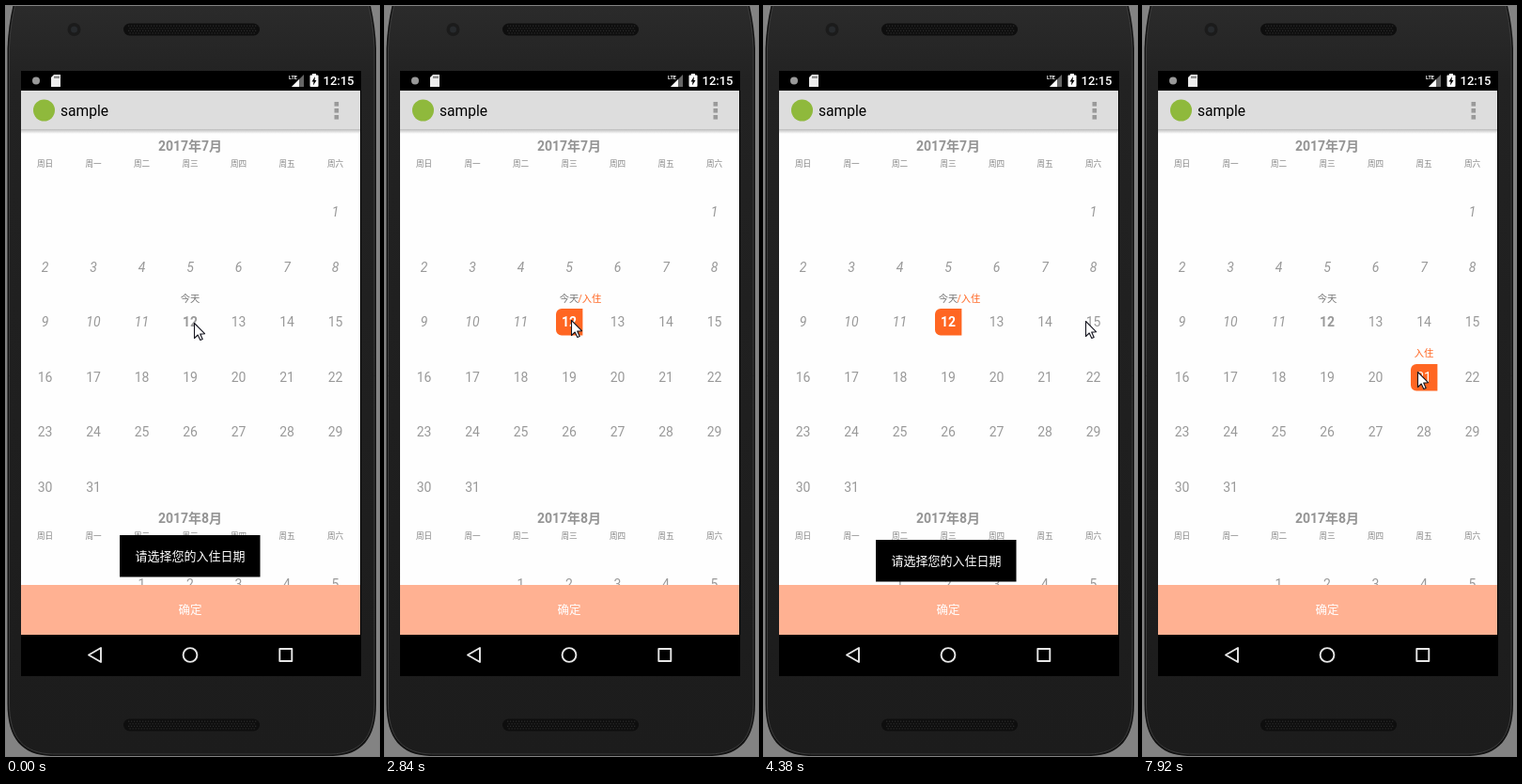
An HTML page with a canvas that plays this animation: 397 by 798 pixels, repeating every 8000 ms.

```html
<!DOCTYPE html>
<html lang="zh-CN">
<head>
<meta charset="utf-8">
<title>Calendar picker</title>
<style>
html, body { margin: 0; width: 100%; height: 100%; overflow: hidden; background: #838383; }
canvas { display: block; width: 397px; height: 798px; }
</style>
</head>
<body>
<canvas id="stage"></canvas>
<script>
const W = 397, H = 798, LOOP = 8000, BEAT = 130;
const FONT = 'Roboto, "Noto Sans CJK SC", "Noto Sans CJK", sans-serif';
const GREY = '#999', ORANGE = '#ff6622';
const CHECK_IN = 2840, CHECK_OUT = 5370, RESTART = 7640;
const canvas = document.getElementById('stage');
const dpr = window.devicePixelRatio || 1;
canvas.width = W * dpr;
canvas.height = H * dpr;
const ctx = canvas.getContext('2d');

// Pointer strokes: start time, beats, end point
const STROKES = [
  [530, 2, 195, 334], [1600, 3, 240, 333], [2150, 3, 198, 334],
  [3350, 2, 283, 346], [3650, 4, 342, 335], [6650, 2, 343, 336],
  [6920, 2, 322, 382], [7190, 2, 304, 395], [7920, 1, 292, 389]
];

const clamp = v => Math.max(0, Math.min(1, v));
const smooth = v => v * v * (3 - 2 * v);
const beats = (t, start) => Math.floor((t - start + 20) / BEAT);

function pointerAt(t) {
  let x = 200, y = 337;
  for (const [start, count, endX, endY] of STROKES) {
    if (t < start) break;
    const p = smooth(clamp((beats(t, start) + 1) / count));
    x += (endX - x) * p;
    y += (endY - y) * p;
  }
  return [Math.round(x), Math.round(y)];
}

function toastAt(t) {
  const leaving = t >= 4380;
  const alpha = t < 920 ? 1 : t < 4530 ? clamp(beats(t, CHECK_IN) / 3.2) : 0;
  return leaving ? [alpha, 119, 568] : [alpha, 121, 563];
}

function choiceAt(t) {
  if (t < CHECK_IN) return [0, 0];
  if (t < RESTART) return [12, t < CHECK_OUT ? 0 : 15];
  return [21, 0];
}

const colX = c => 41.5 + 51.5 * c;
const rowY = r => 219 + 58.6 * r;
const cell = day => {
  const i = day + 5;
  return [colX(i % 7), rowY(Math.floor(i / 7))];
};

function rect(x, y, w, h, color) {
  ctx.fillStyle = color;
  ctx.fillRect(x, y, w, h);
}

function round(x, y, w, h, r, color) {
  ctx.fillStyle = color;
  ctx.beginPath();
  ctx.roundRect(x, y, w, h, r);
  ctx.fill();
}

function disc(x, y, r, color) {
  ctx.fillStyle = color;
  ctx.beginPath();
  ctx.arc(x, y, r, 0, Math.PI * 2);
  ctx.fill();
}

function poly(points, fill, stroke, width = 1) {
  ctx.beginPath();
  points.forEach(p => ctx.lineTo(p[0], p[1]));
  ctx.closePath();
  if (fill) { ctx.fillStyle = fill; ctx.fill(); }
  if (stroke) {
    ctx.strokeStyle = stroke;
    ctx.lineWidth = width;
    ctx.lineJoin = 'round';
    ctx.stroke();
  }
}

function text(s, x, y, size, color, style = '', align = 'center') {
  ctx.font = `${style} ${size}px ${FONT}`;
  ctx.textAlign = align;
  ctx.textBaseline = 'alphabetic';
  ctx.fillStyle = color;
  ctx.fillText(s, x, y);
}

// Chinese label centred on y
const label = (s, x, y, size, color, align) => text(s, x, y + size * .38, size, color, '', align);

function outline(inset) {
  const l = 1.5 + inset, r = 394 - inset, b = H - inset;
  ctx.beginPath();
  ctx.moveTo(l, 45);
  ctx.quadraticCurveTo(l + 1, 16, l + 9, -12);
  ctx.lineTo(r - 9, -12);
  ctx.quadraticCurveTo(r - 1, 16, r, 45);
  ctx.lineTo(r, 742);
  ctx.bezierCurveTo(r, 780, r - 16, b - 1, r - 46, b);
  ctx.lineTo(l + 46, b);
  ctx.bezierCurveTo(l + 16, b - 1, l, 780, l, 742);
  ctx.closePath();
}

function speaker(y) {
  round(125, y, 145, 13, 6.5, '#0e0e0e');
  ctx.fillStyle = '#292929';
  for (let r = 0; r < 4; r++) {
    for (let x = 130 + (r % 2) * 1.5; x < 266; x += 3) ctx.fillRect(x, y + 2 + r * 2.6, 1.3, 1.3);
  }
}

function phone() {
  rect(0, 0, W, H, '#838383');
  outline(0);
  ctx.fillStyle = '#111';
  ctx.fill();
  outline(2);
  const g = ctx.createLinearGradient(0, 0, 0, H);
  g.addColorStop(0, '#2b2b2b');
  g.addColorStop(.1, '#222');
  g.addColorStop(1, '#1c1c1c');
  ctx.fillStyle = g;
  ctx.fill();
  ctx.strokeStyle = '#3b3b3b';
  ctx.lineWidth = 1;
  ctx.stroke();
  speaker(18.5);
  speaker(758.5);
  disc(72.5, 25, 7, '#1b1b1b');
  disc(72.5, 25, 3.5, '#272a2d');
  rect(16, 69, 362, 644, '#000');
}

function statusBar() {
  disc(32, 79.5, 4, '#9a9a9a');
  poly([[51, 73], [58, 73], [58, 86], [48, 86], [48, 76]], '#eee');
  for (let i = 0; i < 3; i++) rect(51.5 + i * 2, 74.5, 1, 2.5, '#333');
  text('LTE', 305.5, 77.5, 5.5, '#fff', 'bold');
  poly([[304, 86], [317, 86], [317, 73]], '#666');
  poly([[304, 86], [312, 86], [312, 78]], '#fff');
  rect(326, 72, 4, 2, '#fff');
  round(323.5, 73.5, 9, 12.5, 1, '#fff');
  poly([[329, 75], [325.5, 80.5], [327.5, 80.5], [327, 84.5], [330.5, 79], [328.5, 79]], '#000');
  text('12:15', 354, 84, 13, '#fff', '500');
}

function actionBar() {
  rect(16, 90, 361, 527, '#fefefe');
  rect(16, 90, 361, 41, '#ddd');
  const g = ctx.createLinearGradient(0, 131, 0, 136);
  g.addColorStop(0, '#bcbcbc');
  g.addColorStop(1, '#fefefe');
  rect(16, 131, 361, 5, g);
  disc(40.5, 111, 11.5, '#8fb93c');
  text('sample', 58, 117, 15.6, '#000', '', 'left');
  for (let i = 0; i < 3; i++) rect(349.5, 102 + i * 7, 4.6, 4.6, '#999');
}

function monthHead(name, y) {
  text(name, 196, y + 5, 14, '#949494', 'bold');
  [...'日一二三四五六'].forEach((d, c) => label('周' + d, colX(c), y + 19, 8.6, '#858585'));
}

function endBlock(day, corners) {
  const [x, y] = cell(day);
  const left = Math.round(x - 14.2), top = Math.round(y - 14);
  round(left, top, 28.4, 28.5, corners, ORANGE);
  return [left, top];
}

function selection(first, last) {
  const [x, y] = cell(first);
  const [left, top] = endBlock(first, [6, 0, 0, 6]);
  const noteY = y - 25.4;
  if (first === 12) label('/入住', 205.5, noteY, 10.3, ORANGE, 'left');
  else label('入住', x, noteY, 10.3, ORANGE);
  if (!last) return;
  const [right] = endBlock(last, [0, 6, 6, 0]);
  rect(left + 28, top, right - left - 28, 28.5, '#ffefe7');
  label('离店', cell(last)[0], noteY, 10.3, ORANGE);
}

function calendar(first, last) {
  ctx.save();
  ctx.beginPath();
  ctx.rect(16, 136, 361, 481);
  ctx.clip();
  monthHead('2017年7月', 149);
  monthHead('2017年8月', 544.5);
  if (first) selection(first, last);
  for (let d = 1; d <= 31; d++) {
    const [x, y] = cell(d);
    const chosen = d === first || d === last;
    const style = d < 12 ? 'italic' : d === 12 ? 'bold' : '';
    text(d, x, y + 5, 14, chosen ? '#fff' : GREY, style);
  }
  label('今天', 196, 310.8, 10.3, '#777');
  for (let d = 1; d <= 5; d++) text(d, colX(d + 1), 619.5, 14, GREY);
  ctx.restore();
}

function bottom() {
  rect(16, 616, 361, 53, '#ffb192');
  label('确定', 196, 642.6, 12.5, '#fff');
  poly([[88, 690.5], [101, 683], [101, 698]], null, '#e6e6e6', 1.9);
  ctx.beginPath();
  ctx.arc(196, 690.5, 7.4, 0, Math.PI * 2);
  ctx.stroke();
  ctx.strokeRect(291.3, 684, 13, 13);
}

function toast(alpha, x, y) {
  if (!alpha) return;
  rect(x, y, 149.5, 44.5, `rgba(0,0,0,${alpha})`);
  label('请选择您的入住日期', x + 75, y + 22.3, 13, `rgba(255,255,255,${clamp(alpha * 1.6)})`);
}

function pointer(x, y) {
  ctx.save();
  ctx.translate(x + .5, y + .5);
  poly([[0, 0], [0, 16], [3.7, 12.5], [6.3, 18], [8.7, 17], [6.2, 11.6], [11, 11.2]], '#fff', '#15151f', 1.1);
  ctx.restore();
}

function draw(t) {
  ctx.setTransform(dpr, 0, 0, dpr, 0, 0);
  phone();
  statusBar();
  actionBar();
  calendar(...choiceAt(t));
  bottom();
  toast(...toastAt(t));
  pointer(...pointerAt(t));
}

const start = performance.now();
function tick() {
  draw((performance.now() - start) % LOOP);
  requestAnimationFrame(tick);
}
tick();
</script>
</body>
</html>
```
